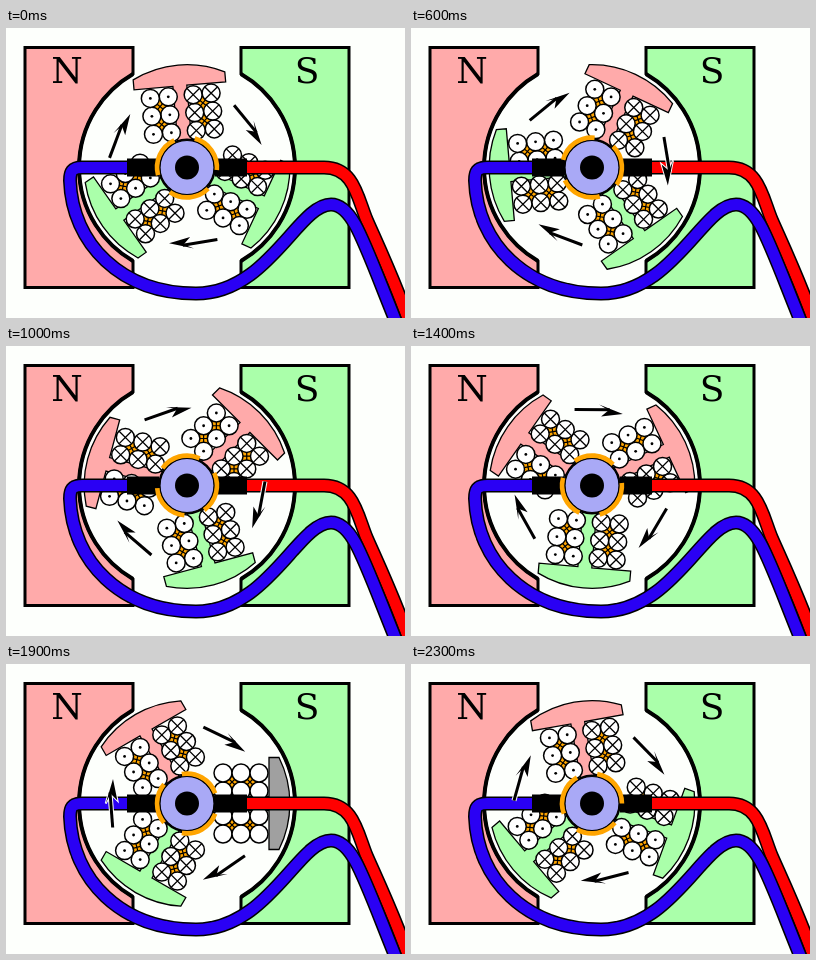
Animation, 399 px wide and 290 px high, one loop 2400 ms. Source, as an HTML page:

```html
<!DOCTYPE html>
<html lang="en">
<head>
<meta charset="utf-8">
<title>Three-pole DC motor</title>
<style>
  html, body { margin: 0; width: 100%; height: 100%; overflow: hidden; background: #fdfffc; }
  svg { display: block; width: 399px; height: 290px; }
  text { font: 36px "DejaVu Serif", serif; text-anchor: middle; }
  .wire path { fill: none; stroke-width: 14; stroke: #000; }
  .wire path + path { stroke-width: 11; stroke: var(--core); }
</style>
</head>
<body>
<svg viewBox="0 -0.5 399 290">
  <defs>
    <g id="coil"><circle r="9" fill="#fff" stroke="#000" stroke-width="1.5"/></g>
    <g id="dot"><use href="#coil"/><circle r="1.4"/></g>
    <g id="cross"><use href="#coil"/><path d="M-6.2-6.2 6.2 6.2M-6.2 6.2 6.2-6.2" stroke="#000" stroke-width="1.3"/></g>
    <path id="shaft" d="M-24-74.3 11-77"/>
    <path id="head" d="M24.5-74 0-81.3 10-76.5 3-69.6Z"/>
    <g id="arrow">
      <g fill="#fff" stroke="#fff">
        <use href="#shaft" stroke-width="5"/>
        <use href="#head" stroke-width="2"/>
      </g>
      <use href="#shaft" stroke="#000" stroke-width="3"/>
      <use href="#head"/>
    </g>
  </defs>

  <g stroke="#000" stroke-width="3">
    <path d="M127 45.5V19H19V259H127V232.5A108 108 0 0 1 127 45.5Z" fill="#faa"/>
    <path d="M235 45.5V19H343V259H235V232.5A108 108 0 0 0 235 45.5Z" fill="#afa"/>
    <path d="M127 45.5A108 108 0 0 0 127 232.5M235 45.5A108 108 0 0 1 235 232.5"
          fill="none" stroke-width="4"/>
  </g>
  <text x="61" y="54">N</text>
  <text x="301" y="54">S</text>

  <g id="arms"></g>

  <path d="M121 130H153V148H121ZM209 130H241V148H209Z"/>
  <g transform="translate(181 139)">
    <circle r="29"/>
    <g id="ring" fill="none" stroke="#ffa500" stroke-width="5"></g>
    <circle r="27" fill="#a9a9f6" stroke="#000" stroke-width="1.2"/>
    <circle r="12"/>
  </g>

  <g id="wires"></g>
  <g id="arrows"></g>
</svg>

<script>
const STEP = 100, STEPS = 24, START = -5, TURN = 5;
const THIRDS = [0, 120, 240];
const byId = id => document.getElementById(id);
const spin = angle => `translate(181 139) rotate(${angle})`;

const wire = (color, d) =>
  `<g class="wire" style="--core:${color}"><path d="${d}"/><path d="${d}"/></g>`;

byId('wires').innerHTML =
  wire('#f00', 'M241 139H318C348 139 351 168 361 192C372 217 390 255 404 296') +
  wire('#2a00f4', 'M121 139H76C66 139 64 143 64 152C66 215 115 265 190 265' +
    'C262 265 292 176 325 176C347 176 357 212 391 296');

// Commutator segments sit opposite the arms.
byId('ring').innerHTML = THIRDS.map(a =>
  `<path d="M-19.1-22.8A29.7 29.7 0 0 1 19.1-22.8" transform="rotate(${a + 60})"/>`).join('');

byId('arrows').innerHTML = THIRDS.map(() => '<use href="#arrow"/>').join('');

function polarity(angle) {
  const a = (angle + 360) % 360;
  if (a === 90 || a === 270) return { fill: '#a0a0a0', left: 'coil', right: 'coil' };
  return a < 90 || a > 270
    ? { fill: '#faa', left: 'dot', right: 'cross' }
    : { fill: '#afa', left: 'cross', right: 'dot' };
}

// The marks stay upright while their places turn with the arm.
function winding(side, mark, angle) {
  const mid = side * 21.5;
  let out = `<rect x="${mid - 9}" y="-72" width="18" height="36" fill="#ffa500" stroke="#000"/>
    <path d="M${mid - 9}-72l18 18-18 18M${mid + 9}-72l-18 18 18 18" fill="none" stroke="#000" stroke-width="1.2"/>`;
  for (const r of [36, 54, 72])
    for (const x of [12.5, 30.5])
      out += `<use href="#${mark}" transform="translate(${side * x} ${-r}) rotate(${-angle})"/>`;
  return out;
}

function arm(angle) {
  const { fill, left, right } = polarity(angle);
  return `<g transform="${spin(angle)}">
    <path d="M-7-25V-82H-46V-92A103 103 0 0 1 46-92V-82H7V-25Z" fill="${fill}" stroke="#000" stroke-width="1.3"/>
    ${winding(-1, left, angle)}${winding(1, right, angle)}</g>`;
}

function pose(step) {
  const angle = START + TURN * step;
  byId('arms').innerHTML = THIRDS.map(a => arm(angle + a)).join('');
  byId('ring').setAttribute('transform', `rotate(${angle})`);
  [...byId('arrows').children].forEach((el, i) =>
    el.setAttribute('transform', spin(angle + THIRDS[i] + 60)));
}

const begin = performance.now();
let shown = -1;
function tick() {
  const step = Math.floor((performance.now() - begin) / STEP) % STEPS;
  if (step !== shown) pose(shown = step);
  requestAnimationFrame(tick);
}
tick();
</script>
</body>
</html>
```
